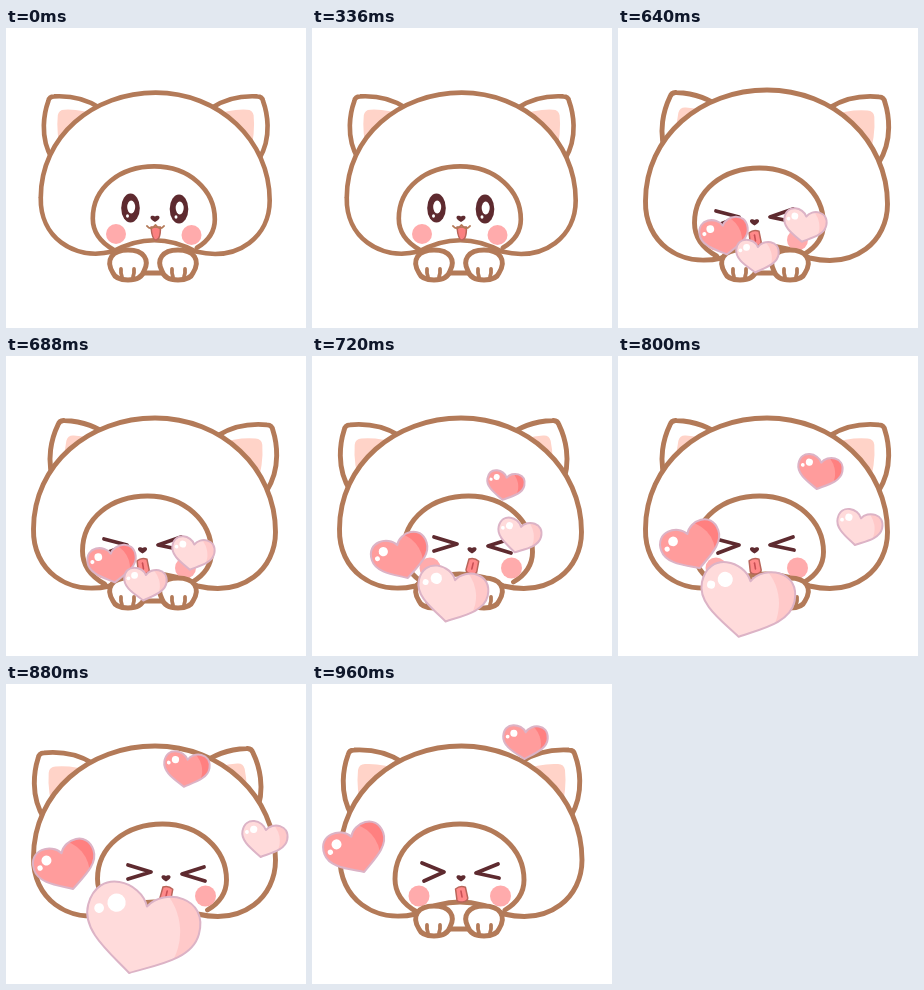
Write an HTML page with a canvas that moves like this. It is 300 by 300 pixels and loops after 1040 ms.

```html
<!DOCTYPE html>
<html lang="en">
<head>
<meta charset="utf-8">
<title>Kitten blowing hearts</title>
<style>
  html, body { margin: 0; width: 100%; height: 100%; overflow: hidden; background: #fff; }
  canvas { display: block; width: 100vw; height: 100vh; }
</style>
</head>
<body>
<canvas id="stage" width="300" height="300"></canvas>
<script>
const ctx = document.getElementById('stage').getContext('2d');

const LINE = '#b37a58', DARK = '#5e2a2f', EAR = '#ffd3c8', CHEEK = '#ffabac';
const LIGHT = { fill: '#ffdbdb', shade: '#ffc9c9' };
const CORAL = { fill: '#ff9c9c', shade: '#ff8080' };

const REST = 560, STEP = 80, LOOP = 1040;
// Head tilt at each step: -1 left, 1 right
const TILT = [0, 0, -1, 1, -1, 1, 0];

// Each heart: colours, first step, then centre x, y, half width and angle per step
const HEARTS = [
  { tone: LIGHT, from: 1, path: [
    [161.5, 209, 18.5, 2], [187.5, 197, 22.5, 10], [208, 179, 23, 14],
    [242, 171, 24, 13], [259, 155, 24, 11]] },
  { tone: CORAL, from: 1, path: [
    [131, 221.5, 20, -2], [105.5, 207.5, 25.5, -8], [87, 199, 30, -18],
    [71.5, 188, 31.5, -20], [57.5, 180, 32.5, -18], [41.5, 163, 32.5, -20]] },
  { tone: LIGHT, from: 2, path: [
    [139.5, 228, 22.5, 6], [141.5, 237.5, 36.5, 13],
    [130.5, 243.5, 48.5, 12], [138, 243.5, 58.5, 15]] },
  { tone: CORAL, from: 3, path: [
    [194, 129, 20, 11], [202.5, 115.5, 23.5, 10], [181, 85, 24, 8], [213.5, 58, 23.5, 3]] }
];

const FACE_SHIFT = { '-1': -6.5, 0: 0, 1: 8.5 };
const CHEEK_SHIFT = { '-1': -9, 0: 0, 1: 11 };
const NOSE_SHIFT = { '-1': -12.5, 0: 0, 1: 11 };
const TONGUE_TURN = { '-1': -9, 0: -10, 1: 13 };
const EYES = {
  '-1': ['M98 183L121 189L100 197', 'M175 181L152 189L176 194'],
  0: ['M110 179L132 188L112 197', 'M186 180L164 189L187 194'],
  1: ['M122 181L145 188L122 195', 'M198 183L176 190L199 197']
};

// The lower edge of the head runs on into the arch of the chin
const HEAD = new Path2D('M104 230C62 240 27 214 28 173C28 108 84 62 149.5 62' +
  'C216 62 270 112 270 176C270 213 238 241 192 230Q148 206 104 230Z');
const FACE = new Path2D('M105 228C89 219 83 207 83 195C83 162 112 140 148 140' +
  'C185 140 212 165 212 196C212 207 208 217 193 226');
const EAR_OUT = new Path2D('M40 132C26 108 32 82 36 71Q37 66 42 66C60 65 75 68 90 78');
const EAR_IN = new Path2D('M46 86Q47 80 53 80Q70 79 92 87L50 128Q44 105 46 86Z');
const PAW = new Path2D('M107 245C99 232 106 222 122 222C138 222 144 232 138 243' +
  'C136 250 130 252 122 252C114 252 109 250 107 245Z');
const TOES = new Path2D('M115 241Q114.500 245 116 249M128 241Q128.500 245 127 249');
const NOSE = new Path2D('M0 3.500C-3 2 -5 0 -4.500 -1.500C-4 -3.500 -1 -3 0 -2' +
  'C1 -3 4 -3.500 4.500 -1.500C5 0 3 2 0 3.500Z');
const HEART = new Path2D('M0 -.45C.2 -.85 1 -.9 1 -.22C1 .25 .4 .5 0 .75' +
  'C-.4 .5 -1 .25 -1 -.22C-1 -.9 -.2 -.85 0 -.45Z');

const rad = deg => deg * Math.PI / 180;

function fill(path, color) {
  ctx.fillStyle = color;
  ctx.fill(path);
}

function stroke(path, color = LINE, width = 4.9) {
  ctx.strokeStyle = color;
  ctx.lineWidth = width;
  ctx.stroke(path);
}

function oval(x, y, rx, ry, color) {
  ctx.beginPath();
  ctx.ellipse(x, y, rx, ry, 0, 0, 7);
  ctx.fillStyle = color;
  ctx.fill();
}

function group(draw) {
  ctx.save();
  draw();
  ctx.restore();
}

function mirror(width) {
  ctx.translate(width, 0);
  ctx.scale(-1, 1);
}

function drawEar(tilt) {
  const [dx, dy, turn] = tilt < 0 ? [16.5, -2, 6] : tilt > 0 ? [-4, 3, -2] : [0, 0, 0];
  ctx.translate(37 + dx, 66 + dy);
  ctx.rotate(rad(turn));
  ctx.translate(-37, -66);
  fill(EAR_OUT, '#fff');
  fill(EAR_IN, EAR);
  stroke(EAR_OUT);
}

function drawHead(tilt) {
  group(() => drawEar(tilt));
  group(() => { mirror(299); drawEar(-tilt); });
  group(() => {
    if (tilt) ctx.translate(-0.5, 0);
    fill(HEAD, '#fff');
    stroke(HEAD);
  });
  group(() => {
    ctx.translate(FACE_SHIFT[tilt], 0);
    stroke(FACE);
  });
}

function drawNose(x, y) {
  group(() => {
    ctx.translate(x, y);
    fill(NOSE, DARK);
  });
}

function drawCalmFace() {
  oval(110, 206, 10, 10, CHEEK);
  oval(185.5, 207, 10, 10, CHEEK);
  for (const [x, y] of [[124.5, 180], [173, 181]]) {
    oval(x, y, 9.3, 14.5, DARK);
    oval(x + 0.7, y - 1, 4, 6.5, '#fff');
    oval(x - 3, y + 8, 1.5, 1.8, '#fff');
  }
  const tongue = new Path2D('M145 199H154.500Q154.500 212 150 212Q146 212 145 199Z');
  fill(tongue, '#fb8080');
  stroke(tongue, '#b8655a', 1.5);
  stroke(new Path2D('M141 198Q145 203 149.500 197Q154 203 158 198'), LINE, 2);
  drawNose(149, 190.5);
}

function drawSqueezedFace(tilt) {
  const shift = CHEEK_SHIFT[tilt];
  oval(107 + shift, 212, 10.5, 10.5, CHEEK);
  oval(188.5 + shift, 212, 10.5, 10.5, CHEEK);
  for (const eye of EYES[tilt]) stroke(new Path2D(eye), DARK, 3.8);
  group(() => {
    ctx.translate(149.5 + NOSE_SHIFT[tilt], 210);
    ctx.rotate(rad(TONGUE_TURN[tilt]));
    const tongue = new Path2D('M-5 -6Q0 -9 5 -6L5.500 5Q5 8 0 8Q-5 8 -5.500 5Z');
    fill(tongue, '#ff8a8a');
    stroke(tongue, '#b8655a', 1.5);
    stroke(new Path2D('M0 -3V3'), '#c94f55', 1.6);
  });
  drawNose(149 + NOSE_SHIFT[tilt], 194);
}

function drawPaws() {
  ctx.fillStyle = '#fff';
  ctx.fillRect(136, 228, 24, 16);
  stroke(new Path2D('M138 245H157'));
  const paw = () => {
    fill(PAW, '#fff');
    stroke(PAW);
    stroke(TOES, LINE, 3.8);
  };
  paw();
  group(() => { mirror(294); paw(); });
}

function drawHeart(tone, [x, y, half, deg]) {
  const size = half - 1.2, lean = Math.sin(rad(deg));
  group(() => {
    // Keep the rotated shape centred on x, y
    ctx.translate(x - 0.25 * lean * size, y + 0.27 * Math.abs(lean) * size);
    ctx.rotate(rad(deg));
    ctx.scale(size, size);
    fill(HEART, tone.shade);
    group(() => {
      ctx.clip(HEART);
      oval(-0.35, 0.1, 1.06, 1.06, tone.fill);
    });
    stroke(HEART, '#dcb3c6', 2 / size);
    oval(-0.53, -0.38, 0.16, 0.16, '#fff');
    oval(-0.8, -0.21, 0.085, 0.085, '#fff');
  });
}

function draw(step) {
  const tilt = TILT[step];
  ctx.fillStyle = '#fff';
  ctx.fillRect(0, 0, 300, 300);
  ctx.lineCap = ctx.lineJoin = 'round';
  group(() => {
    if (step === 0) {
      ctx.translate(149.7, 6);
      ctx.scale(0.946, 0.946);
      ctx.translate(-149.5, 0);
    }
    drawHead(tilt);
  });
  if (step === 0) drawCalmFace();
  else drawSqueezedFace(tilt);
  drawPaws();
  for (const { tone, from, path } of HEARTS) {
    const spot = path[step - from];
    if (spot) drawHeart(tone, spot);
  }
}

function tick(now) {
  const t = now % LOOP;
  draw(t < REST ? 0 : 1 + Math.floor((t - REST) / STEP));
  requestAnimationFrame(tick);
}
requestAnimationFrame(tick);
</script>
</body>
</html>
```
